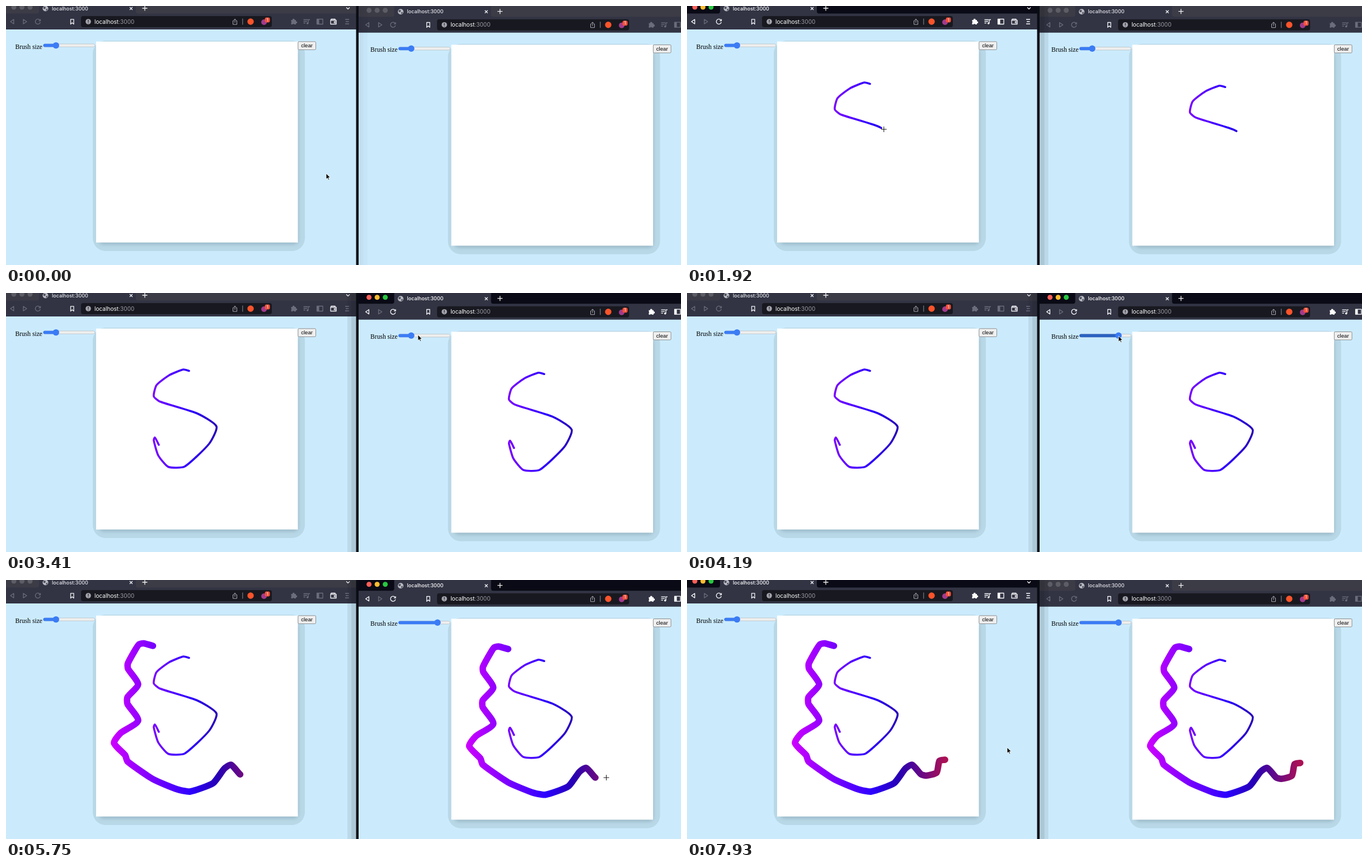
An HTML page that plays this animation: 1206 by 464 pixels, repeating every 8 s.

```html
<!DOCTYPE html>
<html lang="en">
<head>
<meta charset="utf-8">
<title>Shared drawing board</title>
<style>
html, body { margin: 0; width: 100%; height: 100%; overflow: hidden; background: #cbebfd; }
svg { display: block; }
text { white-space: pre; }
.ui { font-family: Inter, Roboto, sans-serif; }
.strip { fill: #3c3c46; }
.bar { fill: #323444; }
.light { fill: #5d5d66; }
.ico, .line { fill: none; stroke: #6b6d7c; stroke-width: 1.3; stroke-linejoin: round; }
.line { stroke: #f2f2f5; }
.solid { fill: #6b6d7c; }
.title { fill: #e6e6ea; }
.on .strip { fill: #090a15; }
.on .ico { stroke: #fff; }
.on .solid, .on .title { fill: #fff; }
.on .light:nth-of-type(1) { fill: #ff5f57; }
.on .light:nth-of-type(2) { fill: #febc2e; }
.on .light:nth-of-type(3) { fill: #28c840; }
.on .ico.dim { stroke: #6b6d7c; }
.fill, .thumb { fill: #3b7cf5; }
.hot .fill { fill: #2a62c1; }
.ink { fill: none; stroke: url(#hue); stroke-linecap: round; stroke-linejoin: round; }
</style>
</head>
<body>
<svg id="stage" width="1206" height="464" viewBox="0 0 1206 464"></svg>
<script>
const LOOP = 8000, STEP = 86.96;
const DX = 634.6, DY = 5.7; // second window relative to the first

const thinPoints = '327 139.5 317 137 292 147 269 165 264 185 275 194.5 341 215.5 376 239 363 270 ' +
  '319 311 290 311.5 272 291 264 264 266 259 273 272';
const thickPoints = '262.5 118 246 113.5 238 115 231 125 217.5 150 218 159 236 187 217 210 217 222 ' +
  '236 252 205 274 193 292 213 314 217 325 263 357 306 375 329 379 370 364 390 338 402 331 ' +
  '418 348 427 350.5 446 345 451 324 461 322';

// soft curve through the points, handles scaled to each segment
function curve(list, tension = .18) {
  const v = list.split(' ').map(Number), pts = [];
  for (let i = 0; i < v.length; i += 2) pts.push([v[i], v[i + 1]]);
  const dir = i => {
    const a = pts[Math.max(0, i - 1)], b = pts[Math.min(pts.length - 1, i + 1)];
    const len = Math.hypot(b[0] - a[0], b[1] - a[1]);
    return [(b[0] - a[0]) / len, (b[1] - a[1]) / len];
  };
  return pts.slice(1).reduce((d, q, i) => {
    const p = pts[i], s = dir(i), e = dir(i + 1);
    const k = Math.hypot(q[0] - p[0], q[1] - p[1]) * tension;
    return `${d}C${p[0] + s[0] * k} ${p[1] + s[1] * k} ${q[0] - e[0] * k} ${q[1] - e[1] * k} ${q}`;
  }, `M${pts[0]}`);
}

const path = (d, cls = 'ico') => `<path class="${cls}" d="${d}"/>`;
const shift = (dx, body) => `<g transform="translate(${dx})">${body}</g>`;

const tabs = () => `
  <rect class="strip" x="-5" y="-7" width="631" height="22"/>
  <path class="bar" d="M-5 13.5H55Q59 13.5 59 9.5V-7H232V9.5Q232 13.5 236 13.5H626V42H-5Z"/>
  <g>${[0, 1, 2].map(i => `<circle class="light" cx="${14 + 14.5 * i}" cy="2" r="4.5"/>`).join('')}</g>
  <circle cx="70.5" cy="4.5" r="5" fill="#b9bac2"/>
  <path d="M67 2 70 1 71 4 68.5 5.5Q66 4 67 2M71 6.5 74 4.5 74 7 72 8.5Z" fill="#474956"/>
  <text class="ui title" x="82" y="7.7" font-size="9" font-weight="500">localhost:3000</text>
  ${path('M221 2 226 7M226 2 221 7', 'line')}
  ${path('M248 -.5V8.5M243.5 4H252.5', 'line')}
  ${path('M608 2.5 611 5.5 614 2.5', 'line')}
  ${path('M13.8 24V32L8 28Z')}
  ${path('M31 24V32L37 28Z', 'ico dim')}
  ${path('M60.5 25.2A4.5 4.5 0 1 0 61.3 29M61.5 23.5V26.5H58.5')}`;

const address = grow => `
  ${path('M115.5 23.8H121V32.5L118.25 30 115.5 32.5Z', 'line')}
  <rect x="134" y="18" width="${341 + grow / 2}" height="20" rx="4" fill="#181920"/>
  <circle cx="147" cy="28" r="4.8" fill="#a3a4ac"/>
  <path d="M147 25V28.5M147 29.7V30.8" stroke="#181920" stroke-width="1.2"/>
  <text class="ui" x="158" y="31.7" font-size="10.1" fill="#fff">localhost<tspan fill="#9b9ca4">:3000</tspan></text>`;

const tools = () => `
  <path d="M407 26.5H405.5V33H412.5V26.5H411M409 30V23.5M406.8 25.5 409 23.2 411.2 25.5" fill="none" stroke="#a9aab2"/>
  <path d="M422.8 22.5V33.5" stroke="#8d8e98"/>
  <circle cx="437" cy="28" r="5.7" fill="#fb542b"/>
  <circle cx="461" cy="29" r="5" fill="#a23a8c"/>
  <rect x="462.5" y="20.5" width="9" height="9" rx="3" fill="#f4513b"/>
  <text class="ui" x="467" y="27.7" font-size="7" text-anchor="middle" fill="#fff">1</text>
  ${path('M509.5 25H512A1.8 1.8 0 1 1 515.5 25H518V27.5A1.8 1.8 0 1 1 518 31V33H515A1.6 1.6 0 0 0 512 33H509.5V30A1.6 1.6 0 0 0 509.5 27.5Z', 'solid')}
  ${path('M531.5 24.5H539M531.5 27.5H538M531.5 30.5H535M540 31V24.5H543')}
  <circle class="solid" cx="538.7" cy="31" r="1.8"/>
  ${path('M555.5 23.5H566V32.5H555.5Z')}
  ${path('M555.5 23.5H559.5V32.5H555.5Z', 'solid')}
  ${path('M580 25.5V32.5H590V25.5H580L581 23.5H588V25.5M590 27.8H586.5V30.2H590', 'line')}
  ${path('M606 24H613M607 28H612.5M606 32H613')}`;

const page = () => `
  <text x="16.5" y="76.5" font-size="11.55" font-family="Liberation Serif, serif">Brush size</text>
  <rect x="66.8" y="68" width="92" height="5.2" rx="2.6" fill="#efefef" stroke="#b5b8ba" stroke-width=".7"/>
  <rect class="fill" x="66.5" y="67.7" height="5.8" rx="2.9"/>
  <circle class="thumb" cy="70.6" r="5.7"/>
  <rect x="155" y="62" width="379" height="377" rx="23" fill="#b9d8e7"/>
  <rect x="166" y="76" width="356" height="351" rx="8" fill="#98b7c6" filter="url(#soft)"/>
  <rect x="161" y="63.7" width="360.5" height="360" fill="#fff"/>
  <rect x="521.8" y="63.8" width="31.7" height="14.5" rx="1.8" fill="#efefef" stroke="#767676" stroke-width=".8"/>
  <text x="537.6" y="74.3" font-size="9.6" text-anchor="middle" font-family="Liberation Sans, sans-serif">clear</text>
  <use href="#thin"/><use href="#thick"/>`;

// grow: extra toolbar width; shade: x of the neighbour's shadow, wide and narrow band
const win = (x, y, grow, shade) => `
  <g class="win" transform="translate(${x} ${y})">
    <rect x="-5" y="-7" width="631" height="480" fill="#cbebfd"/>
    ${tabs()}${shift(grow * .35, address(grow))}${shift(grow, tools())}${page()}
    <g class="shade" fill-opacity=".08">
      <rect x="${shade[0]}" y="-7" width="16" height="480"/>
      <rect x="${shade[1]}" y="-7" width="9" height="480"/>
    </g>
  </g>`;

document.getElementById('stage').innerHTML = `
  <defs>
    <linearGradient id="hue" gradientUnits="userSpaceOnUse" x1="190" y1="0" x2="460" y2="0">
      <stop stop-color="#cc00ff"/>
      <stop offset=".52" stop-color="#2c00ff"/>
      <stop offset=".7" stop-color="#2600b4"/>
      <stop offset="1" stop-color="#ab1155"/>
    </linearGradient>
    <filter id="soft"><feGaussianBlur stdDeviation="3"/></filter>
    <path id="thin" class="ink" stroke-width="3.6" pathLength="1" d="${curve(thinPoints)}"/>
    <path id="thick" class="ink" stroke-width="11.6" pathLength="1" d="${curve(thickPoints)}"/>
  </defs>
  ${win(0, 0, 0, [610, 617])}${win(DX, DY, 4.4, [-5, -5])}
  <rect x="625.5" width="4.5" height="464" fill="#0b0d15"/>
  <path id="cross" d="M-5 0H5M0 -5V5" stroke="#111"/>
  <path id="arrow" d="M0 0V10.3L2.4 8.1 4 11.6 5.6 10.9 4.1 7.5H7.3Z" stroke="#fff" stroke-width=".8"/>`;

// pointer stops: [step, x, y]
const stops = [
  [0, 572, 300], [5, 572, 300], [8, 534, 291], [12, 280, 131], [14, 255, 150], [17, 327, 139],
  [30, 273, 272], [32, 731, 109], [36, 744, 17], [39, 736, 75], [43, 724, 77], [48, 771, 77],
  [52, 908, 132], [68, 1095, 328], [72, 780, 89], [76, 763, 80], [80, 763, 80],
  [82, 270, 78], [86, 91, 71], [91, 84, 69]];

const clamp = (v, lo, hi) => Math.min(hi, Math.max(lo, v));
const progress = (n, from, to) => clamp((n - from) / (to - from), 0, 1);
const within = (n, a, b) => n >= a && n < b;

function pointerAt(n) {
  const i = clamp(stops.findIndex(s => s[0] > n), 1, stops.length - 1);
  const [t0, x0, y0] = stops[i - 1], [t1, x1, y1] = stops[i];
  const p = progress(n, t0, t1);
  return [x0 + (x1 - x0) * p, y0 + (y1 - y0) * p];
}

const byId = id => document.getElementById(id);
const thin = byId('thin'), thick = byId('thick'), cross = byId('cross'), arrow = byId('arrow');
const wins = [...document.querySelectorAll('.win')];
const show = (el, on) => el.style.display = on ? '' : 'none';

function reveal(el, f) {
  el.style.strokeDasharray = f < 1 ? `${f} 2` : 'none';
  el.style.visibility = f > 0 ? 'visible' : 'hidden';
}

// the pointer runs a little ahead of the ink
function tip(el, f, lead) {
  const len = el.getTotalLength(), p = el.getPointAtLength(Math.min(len, f * len + lead));
  return [p.x, p.y];
}

function setSlider(w, x, hot) {
  w.querySelector('.thumb').setAttribute('cx', x);
  w.querySelector('.fill').setAttribute('width', x - 66.5);
  w.classList.toggle('hot', hot);
}

const overBoard = (x, y) => within(x, 161, 521) && within(y, 64, 424);

function draw(n) {
  const active = n < 6 ? -1 : within(n, 39, 88) ? 1 : 0;
  wins.forEach((w, i) => {
    w.classList.toggle('on', i === active);
    const shade = w.querySelector('.shade');
    show(shade, active < 0 ? i === 1 : i !== active);
    shade.setAttribute('opacity', active < 0 ? .3 : 1);
  });

  const f = progress(n, 17, 28.6), g = progress(n, 52.5, 67) ** 1.52;
  reveal(thin, f);
  reveal(thick, g);
  setSlider(wins[0], 89.3, false);
  setSlider(wins[1], pointerAt(clamp(n, 43, 48))[0] - DX, within(n, 43, 50) || within(n, 74, 81));

  let [x, y] = pointerAt(n);
  if (within(n, 17, 30)) [x, y] = tip(thin, f, 5);
  if (within(n, 53, 69)) {
    [x, y] = tip(thick, g, 20);
    x += DX;
    y += DY;
  }
  const drawing = overBoard(x, y) || overBoard(x - DX, y - DY);
  show(cross, drawing);
  show(arrow, !drawing);
  (drawing ? cross : arrow).setAttribute('transform', `translate(${x} ${y})`);
}

function tick() {
  const t = performance.now() % LOOP;
  draw(Math.max(0, Math.floor((t - 5) / STEP)));
  requestAnimationFrame(tick);
}
tick();
</script>
</body>
</html>
```
